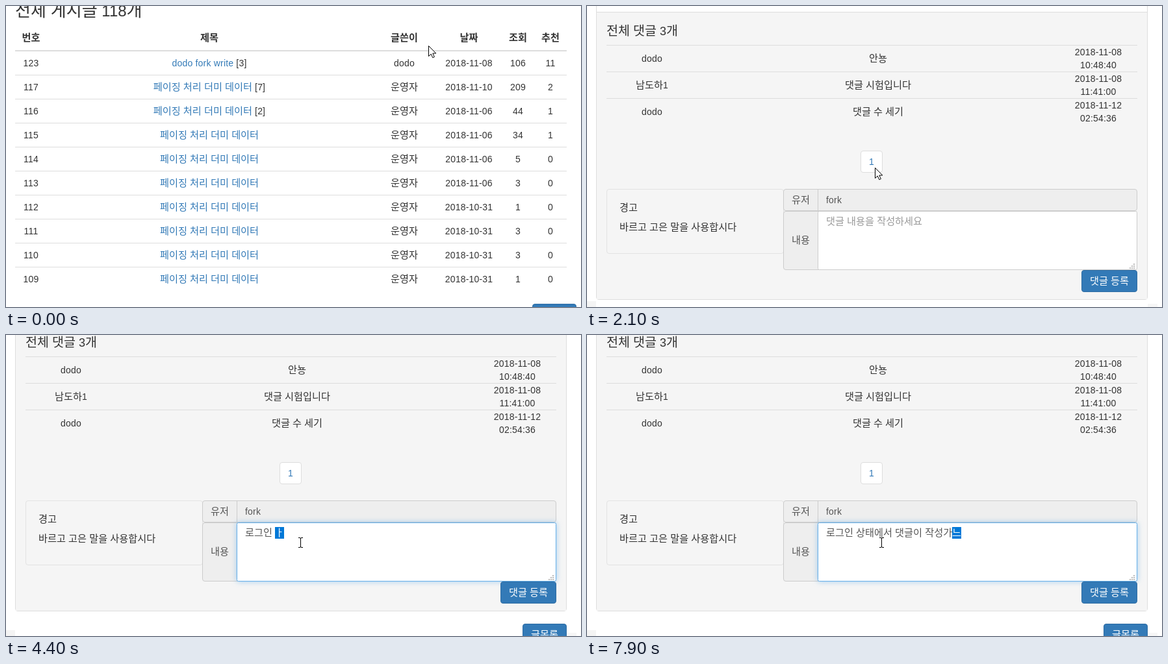
An HTML page that plays this animation: 885 px wide and 464 px high, repeating every 8000 ms.

```html
<!DOCTYPE html>
<html lang="ko">
<head>
<meta charset="utf-8">
<style>
html, body { margin: 0; width: 100%; height: 100%; overflow: hidden; background: #fff; }
svg { display: block; }
text { font: 14px "Liberation Sans", "Noto Sans CJK KR", sans-serif; fill: #333; white-space: pre; }
text.body { letter-spacing: .2px; }
text.bold { font-weight: bold; }
text .ko { font-size: 1.087em; letter-spacing: 0; }
.link { fill: #337ab7; }
</style>
</head>
<body>
<svg id="stage" width="885" height="464"></svg>
<script>
const LOOP = 8000, FRAME = 100;

// Hangul is set slightly larger so that a syllable is one em wide.
const ko = s => s.replace(/[가-힣ㄱ-ㅣ]+/g, '<tspan class="ko">$&</tspan>');
const text = (x, y, s, { anchor = 'start', size = 14, fill = '#333', cls = '' } = {}) =>
  `<text x="${x}" y="${y}" text-anchor="${anchor}" class="${cls} ${size === 14 ? 'body' : ''}" style="font-size:${size}px;fill:${fill}">${ko(s)}</text>`;
const mid = (x, y, s, opt) => text(x, y, s, { anchor: 'middle', ...opt });
const fill = (x, y, w, h, color) => `<rect x="${x}" y="${y}" width="${w}" height="${h}" fill="${color}"/>`;
const box = (x, y, w, h, color, stroke, r = 3.5) =>
  `<rect x="${x + .5}" y="${y + .5}" width="${w - 1}" height="${h - 1}" rx="${r}" fill="${color}" stroke="${stroke}"/>`;
const well = (x, y, w, h) => box(x, y, w, h, '#f5f5f5', '#e3e3e3');
const button = (x, y, w, s, color = '#337ab7', stroke = '#2e6da4') =>
  box(x, y, w, 34, color, stroke) + mid(x + w / 2, y + 22, s, { fill: '#fff' });

function listPage() {
  const cols = [38.5, 313, 613, 712.5, 788, 838];
  const dummy = '페이징 처리 더미 데이터', admin = '운영자';
  const rows = [
    [123, 'dodo fork write', 3, 'dodo', '11-08', 106, 11],
    [117, dummy, 7, admin, '11-10', 209, 2],
    [116, dummy, 2, admin, '11-06', 44, 1],
    [115, dummy, 0, admin, '11-06', 34, 1],
    [114, dummy, 0, admin, '11-06', 5, 0],
    [113, dummy, 0, admin, '11-06', 3, 0],
    [112, dummy, 0, admin, '10-31', 1, 0],
    [111, dummy, 0, admin, '10-31', 3, 0],
    [110, dummy, 0, admin, '10-31', 3, 0],
    [109, dummy, 0, admin, '10-31', 1, 0]
  ];
  let out = text(14, 16, '전체 게시글 118개', { size: 24 });
  ['번호', '제목', '글쓴이', '날짜', '조회', '추천'].forEach((s, i) =>
    out += mid(cols[i], 54, s, { cls: 'bold' }));
  out += '<g id="hover">' + fill(14, 70, 849, 36, '#f7f9fc') + '</g>' + fill(14, 68, 849, 2, '#ddd');
  rows.forEach(([no, title, replies, user, date, views, likes], i) => {
    const y = 93 + 37 * i;
    const name = `<tspan class="link">${title}</tspan>` + (replies ? ` [${replies}]` : '');
    if (i) out += fill(14, y - 24, 849, 1, '#ddd');
    [String(no), name, user, '2018-' + date, String(views), String(likes)].forEach((s, c) =>
      out += mid(cols[c], y, s));
  });
  return out + button(810, 459, 68, '글쓰기') +
    '<g id="status">' + fill(0, 455, 375, 9, '#f2f2f2') +
    text(7, 471, 'http://localhost:8080/board/view?no=123&amp;page=1&amp;type=all', { fill: '#666' }) + '</g>';
}

function postPage() {
  const gray = { fill: '#555' };
  const info = ['번호 123', 'dodo', '2018-11-08', '조회 106', '추천 11', '댓글 3'].join('\u00a0\u00a0|\u00a0\u00a0');
  const replies = [
    ['dodo', '안뇽', '2018-11-08', '10:48:40'],
    ['남도하1', '댓글 시험입니다', '2018-11-08', '11:41:00'],
    ['dodo', '댓글 수 세기', '2018-11-12', '02:54:36']
  ];
  let out = box(14, -70, 100, 92, '#fff', '#ddd') + fill(19, -65, 90, 82, '#8cc63f') +
    text(14, 93, '자유게시판', { size: 36 }) +
    box(14, 112, 849, 818, '#fff', '#ddd') +
    fill(15, 113, 847, 96, '#f5f5f5') +
    text(30, 164, 'dodo fork write [3]', { size: 24 }) +
    text(847, 194, info, { anchor: 'end' }) +
    well(30, 224, 817, 70) + text(50, 259, '광고 1') +
    text(30, 329, 'dddddd') +
    well(30, 344, 817, 74) + button(402, 364, 73, '추천 11') +
    button(775, 438, 72, '글 수정', '#5cb85c', '#4cae4c') +
    fill(15, 487, 847, 442, '#f5f5f5') + fill(15, 486, 847, 1, '#ddd') +
    text(30, 522, '전체 댓글 3개', { size: 18 });
  replies.forEach(([user, body, date, time], i) => {
    const y = 537 + 41 * i;
    out += fill(30, y, 817, 1, '#ddd') + mid(100, y + 26, user) + mid(448, y + 26, body) +
      mid(787, y + 16, date) + mid(787, y + 36, time);
  });
  out += box(421, 700, 34, 34, '#fff', '#ddd') + mid(438, 722, '1', { fill: '#337ab7' }) +
    well(30, 759, 273, 100) + text(50, 793, '경고') + text(50, 823, '바르고 고은 말을 사용합시다') +
    box(302, 759, 545, 34, '#eee', '#ccc') + fill(355, 760, 1, 32, '#ccc') +
    mid(329, 781, '유저', gray) + text(368, 781, 'fork', gray) +
    box(302, 793, 545, 91, '#eee', '#ccc') + mid(329, 843, '내용', gray) +
    box(355, 793, 492, 91, '#fff', '#ccc', 2) +
    '<g id="focus" style="filter:drop-shadow(0 0 4px rgba(102,175,233,.6))">' +
    box(355, 793, 492, 91, '#fff', '#66afe9', 2) + '</g>';
  for (let i = 0; i < 3; i++)
    for (let j = 0; j <= i; j++) out += fill(841 - 3 * j, 874 + 3 * i, 2, 2, '#bbb');
  return out + text(368, 814, '댓글 내용을 작성하세요', { fill: '#999', cls: 'hint' }) +
    text(368, 814, '', { ...gray, cls: 'done' }) +
    '<rect id="mark" y="800" width="14" height="18" fill="#0078d7"/>' +
    text(0, 814, '', { fill: '#fff', cls: 'comp' }) +
    '<rect id="caret" y="800" width="1" height="16" fill="#000"/>' +
    button(761, 884, 86, '댓글 등록') + button(795, 949, 68, '글목록');
}

const cursors =
  '<path id="arrow" d="M.5 .5V16.5L4.2 13L6.8 18.7L9.4 17.5L6.8 12H11.8Z" fill="#fff" stroke="#000"/>' +
  '<path id="hand" d="M-1.5 1.5Q0-.5 1.5 1.5V8Q3.5 6.5 5 8.5Q7 7.5 8.5 9.5Q11 9 11 11V15L9 21.5H-1L-6.5 13Q-6.5 10-3.5 11.5L-1.5 13Z" fill="#fff" stroke="#000"/>' +
  '<path id="beam" d="M-3-7.5H-1Q.5-7.5.5-6V6Q.5 7.5-1 7.5H-3M4-7.5H2Q.5-7.5.5-6M4 7.5H2Q.5 7.5.5 6" fill="none" stroke="#000"/>';

const $ = s => document.querySelector(s);
$('#stage').innerHTML =
  `<g id="list">${listPage()}</g><g id="post"><g id="scroll">${postPage()}</g>` +
  fill(0, 455, 14, 9, '#f4f4f4') + fill(863, 459, 15, 5, '#f7f7f7') +
  `<g id="strip">${fill(0, 455, 375, 9, '#f2f2f2')}</g></g><g id="cursor">${cursors}</g>`;

// Each entry: time, finished text, syllable still being composed.
const typing = [[0, '', ''], [3000, ' ', ''], [3400, '', '']];
function type(start, prefix, states) {
  states.split(',').forEach((s, i) => {
    const [done, comp = ''] = s.split('|');
    typing.push([start + i * FRAME, prefix + done, comp]);
  });
}
type(3600, '', '|ㄹ,|로,|록,로|그,로|긍,로그|이,로그|인,로그인 ,로그인 |ㅏ');
type(4900, '로그인 ', '');
type(5100, '로그인 ', '|ㅅ');
type(5300, '로그인 ', '|사,상|ㅌ,상|태,상|탱,상태|에,상태에|서,상태에서 ,상태에서 |ㄱ');
type(6200, '로그인 상태에서 ', ',|ㄷ,|대,|댓,댓|ㄱ,댓|글,댓글|ㅇ,댓글|이,댓글이 ');
type(7100, '로그인 상태에서 댓글이 ', '|ㅈ,|자,|작,작|서,작|성');
type(7700, '로그인 상태에서 댓글이 작성', '|ㄱ,|가,가|느');

const path = [[0, 650, 61], [300, 340, 96], [800, 340, 96], [1000, 454, 208], [1900, 454, 208],
  [2300, 432, 289], [2500, 443, 308], [2600, 443, 308], [2800, 453, 320], [LOOP, 453, 320]];

const clamp = v => Math.min(1, Math.max(0, v));
const easeOut = (t, start, length, power) => 1 - (1 - clamp((t - start) / length)) ** power;
const show = (s, on) => $(s).style.display = on ? '' : 'none';

function cursorAt(t) {
  const i = path.findIndex(p => p[0] > t);
  const [t0, x0, y0] = path[i - 1], [t1, x1, y1] = path[i];
  const p = (t - t0) / (t1 - t0);
  return [x0 + (x1 - x0) * p, y0 + (y1 - y0) * p].map(Math.round);
}

function draw(t) {
  const inPost = t >= 1000;
  show('#list', !inPost);
  show('#post', inPost);
  show('#hover', t >= 200);
  show('#strip', t < 1400);
  $('#status').style.opacity = clamp((t - 400) / 200);
  const top = Math.round(378 * easeOut(t, 1300, 400, 2) + 126 * easeOut(t, 1900, 500, 3));
  $('#scroll').setAttribute('transform', `translate(0 ${-top})`);
  $('#focus').style.opacity = clamp((t - 2600) / 200);

  const [, done, comp] = typing.filter(k => k[0] <= t).pop();
  $('.done').innerHTML = ko(done);
  $('.comp').innerHTML = ko(comp);
  const end = 368 + (done && inPost ? Math.round($('.done').getComputedTextLength()) : 0);
  for (const s of ['#mark', '.comp', '#caret']) $(s).setAttribute('x', end);
  show('.hint', !done && !comp);
  show('#mark', comp);
  show('#caret', t >= 2700 && !comp && !(t >= 3200 && t < 3400));

  $('#cursor').setAttribute('transform', `translate(${cursorAt(t)})`);
  show('#hand', t >= 300 && t < 900);
  show('#beam', t >= 2200);
  show('#arrow', t < 300 || t >= 900 && t < 2200);
}

const begin = performance.now();
function tick() {
  const t = (performance.now() - begin) % LOOP;
  draw(Math.floor(t / FRAME) * FRAME);
  requestAnimationFrame(tick);
}
tick();
</script>
</body>
</html>
```
